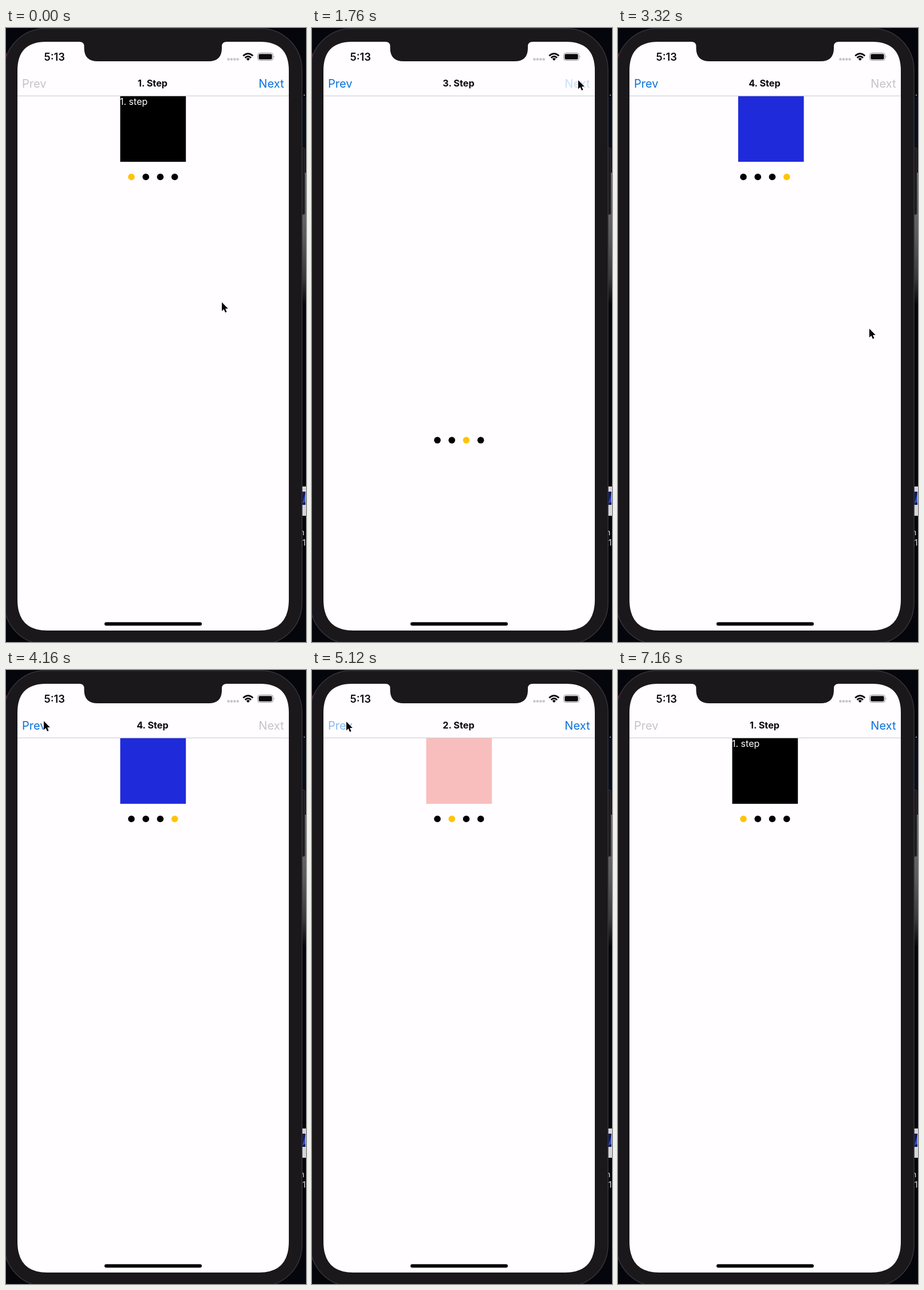
An HTML page that plays this animation: 524x1070 px, repeating every 7.2 s.

```html
<!DOCTYPE html>
<html lang="en">
<head>
<meta charset="utf-8">
<title>Step navigation</title>
<style>
  html, body { margin: 0; width: 100%; height: 100%; overflow: hidden; background: #05060c; }
  svg { display: block; width: 524px; height: 1070px; }
  text { font-family: Inter, Roboto, sans-serif; }
</style>
</head>
<body>
<svg viewBox="0 0 524 1070">
  <defs>
    <clipPath id="screenClip">
      <path id="screenShape" d="M70 24H128Q136.500 24 136.500 32V35Q136.500 58 160 58H354Q377 58 377 35V32Q377 24 386 24H444Q494 24 494 74V996Q494 1050 442 1050H72Q20 1050 20 996V74Q20 24 70 24Z"/>
    </clipPath>
    <linearGradient id="surface" x1="0" y1="0" x2="0" y2="1">
      <stop offset="0" stop-color="#77777a"/>
      <stop offset=".5" stop-color="#59595c"/>
      <stop offset=".8" stop-color="#3a3a3d"/>
      <stop offset="1" stop-color="#08090d"/>
    </linearGradient>
  </defs>

  <!-- Desktop behind the phone -->
  <rect width="524" height="1070" fill="#05060c"/>
  <rect x="512" y="120" width="12" height="130" fill="#080d1b"/>
  <rect x="512" y="252" width="12" height="228" fill="url(#surface)"/>
  <circle cx="521" cy="117" r="1" fill="#b8bac4"/>
  <rect x="510" y="799" width="14" height="51" fill="#d5d4da"/>
  <rect x="510" y="808" width="13" height="23" fill="#111b54"/>
  <path d="M518 828L523 810V826Z" fill="#3552c4"/>
  <text x="513" y="884" font-size="14" fill="#e4e4e8">n</text>
  <text x="515" y="902" font-size="14" fill="#e4e4e8">.1</text>

  <!-- Phone -->
  <rect x="514" y="209" width="8" height="116" rx="2" fill="#1c1b1e" stroke="#38373a"/>
  <rect x="-3" y="1" width="520" height="1073" rx="72" fill="#1a181b" stroke="#353337" stroke-width="1.500"/>
  <rect y="44" width="1" height="4" fill="#8b1f2d"/>
  <use href="#screenShape" fill="#fffdff"/>

  <g clip-path="url(#screenClip)">
    <g id="panel">
      <rect id="panelBox" x="199.500" y="118.500" width="114.700"/>
      <text id="panelText" x="199" y="134" font-size="16" fill="#fff"></text>
    </g>
    <g id="dots"></g>
  </g>

  <!-- Header -->
  <rect x="20" y="117.800" width="474" height="1" fill="#c9c7cb"/>
  <text id="prev" x="28" y="103.500" font-size="20">Prev</text>
  <text id="title" x="256" y="102" font-size="16.300" font-weight="700" text-anchor="middle" fill="#0b0a0c"></text>
  <text id="next" x="485.500" y="103.500" font-size="20" text-anchor="end">Next</text>

  <!-- Status bar -->
  <text x="66.500" y="56.800" font-size="18.300" font-weight="600" fill="#0b0a0c">5:13</text>
  <path d="M388.500 54.500H405" stroke="#c5c4c8" stroke-width="4.600" stroke-linecap="round" stroke-dasharray="0 5.400"/>
  <g fill="none" stroke="#0b0a0c" stroke-width="2.700">
    <path d="M414.200 48.600Q422.800 40.600 431.400 48.600"/>
    <path d="M417.500 52Q422.800 47 428.100 52"/>
  </g>
  <path d="M419.700 53.700Q422.800 51 425.900 53.700L422.800 57Z" fill="#0b0a0c"/>
  <rect x="439.500" y="43.500" width="27" height="13" rx="4" fill="none" stroke="#8c8a8e"/>
  <rect x="441.300" y="45.200" width="23.400" height="9.600" rx="2.300" fill="#0b0a0c"/>
  <path d="M468 48Q469.800 50 468 52Z" fill="#8c8a8e"/>
  <rect x="172" y="1035.500" width="170" height="6" rx="3" fill="#000"/>

  <path id="cursor" d="M0 0V15.200L3.500 12L6 17.800L8.500 16.700L6.100 11.100H10.800Z" stroke="#fff" stroke-width="1" paint-order="stroke"/>
</svg>

<script>
const LOOP = 7200, FRAME = 40, POINT = 114.7 / 100;
const ENTER = 500, PRESS = 150, RELEASE = 250, PRESSED_OPACITY = 0.2;
const BLUE = '#0872dd', GREY = '#c4c3c7';

const steps = [
  { color: '#000', height: 100, label: '1. step' },
  { color: '#e8352e', height: 100, label: '' },
  { color: '#8fda73', height: 500, label: '' },
  { color: '#1f2bdb', height: 100, label: '' }
];

// Each visit: release time of the button, step shown from then on
const visits = [[-LOOP, 0], [1000, 1], [1740, 2], [2915, 3], [4339, 2], [5016, 1], [5693, 0]];

// Pointer stops: time, x, y
const pointerStops = [
  [0, 377, 478], [680, 466, 91], [1760, 465, 91], [2440, 465, 91], [2600, 464, 99],
  [3140, 466, 101], [3320, 439, 524], [3420, 430, 527], [4000, 80, 115], [4120, 66, 89],
  [4520, 66, 89], [4760, 60, 90], [6240, 60, 90], [6400, 62, 56]
];
const POINTER_LEAVES = 6400;

const el = id => document.getElementById(id);
const clamp = v => Math.min(1, Math.max(0, v));
const mix = (a, b, u) => a + (b - a) * u;
const smooth = u => u * u * (3 - 2 * u);
const inOutQuad = u => u < 0.5 ? 2 * u * u : 1 - 2 * (1 - u) ** 2;

// cubic-bezier(.25, .1, .25, 1)
function ease(x) {
  const bezier = (a, b, s) => 3 * a * s * (1 - s) ** 2 + 3 * b * s * s * (1 - s) + s ** 3;
  let low = 0, high = 1;
  for (let i = 0; i < 24; i++) {
    const mid = (low + high) / 2;
    if (bezier(0.25, 0.25, mid) < x) low = mid; else high = mid;
  }
  return bezier(0.1, 1, low);
}

const dots = steps.map((_, i) => {
  const dot = document.createElementNS('http://www.w3.org/2000/svg', 'circle');
  dot.setAttribute('cx', 219 + i * 22 * POINT);
  dot.setAttribute('r', 5.8);
  return el('dots').appendChild(dot);
});

function buttonOpacity(forward, time) {
  let opacity = 1;
  for (let i = 1; i < visits.length; i++) {
    const [at, step] = visits[i];
    if ((step > visits[i - 1][1]) !== forward) continue;
    if (time >= at - PRESS && time < at)
      opacity = mix(1, PRESSED_OPACITY, inOutQuad((time - at + PRESS) / PRESS));
    else if (time >= at && time < at + RELEASE)
      opacity = mix(PRESSED_OPACITY, 1, inOutQuad((time - at) / RELEASE));
  }
  return opacity;
}

function drawButton(id, enabled, opacity) {
  el(id).setAttribute('fill', enabled ? BLUE : GREY);
  el(id).setAttribute('opacity', opacity);
}

function drawPointer(time) {
  const i = Math.max(1, pointerStops.findIndex(stop => stop[0] > time));
  const [t0, x0, y0] = pointerStops[i - 1], [t1, x1, y1] = pointerStops[i];
  const u = smooth(clamp((time - t0) / (t1 - t0)));
  el('cursor').setAttribute('transform', `translate(${mix(x0, x1, u)} ${mix(y0, y1, u)})`);
  el('cursor').setAttribute('visibility', time < POINTER_LEAVES ? 'visible' : 'hidden');
}

function draw(time) {
  const index = visits.findLastIndex(visit => visit[0] <= time);
  const [start, current] = visits[index];
  const step = steps[current];
  const entered = ease(clamp((time - start) / ENTER));
  const forward = index > 0 && current > visits[index - 1][1];

  // Forward steps slide in from the right, backward steps fade in
  const offset = forward ? (1 - entered) * 414 * POINT : 0;
  el('panel').setAttribute('transform', `translate(${offset} 0)`);
  el('panel').setAttribute('opacity', forward ? 1 : entered);
  el('panelBox').setAttribute('height', step.height * POINT);
  el('panelBox').setAttribute('fill', step.color);
  el('panelText').textContent = step.label;

  dots.forEach((dot, i) => {
    dot.setAttribute('cy', 144.8 + step.height * POINT);
    dot.setAttribute('fill', i === current ? '#ffc40a' : '#000');
  });

  el('title').textContent = `${current + 1}. Step`;
  drawButton('prev', current > 0, buttonOpacity(false, time));
  drawButton('next', current < steps.length - 1, buttonOpacity(true, time));
  drawPointer(time);
}

const begin = performance.now();
function tick() {
  const time = (performance.now() - begin) % LOOP;
  draw(Math.floor(time / FRAME) * FRAME);
  requestAnimationFrame(tick);
}
tick();
</script>
</body>
</html>
```
